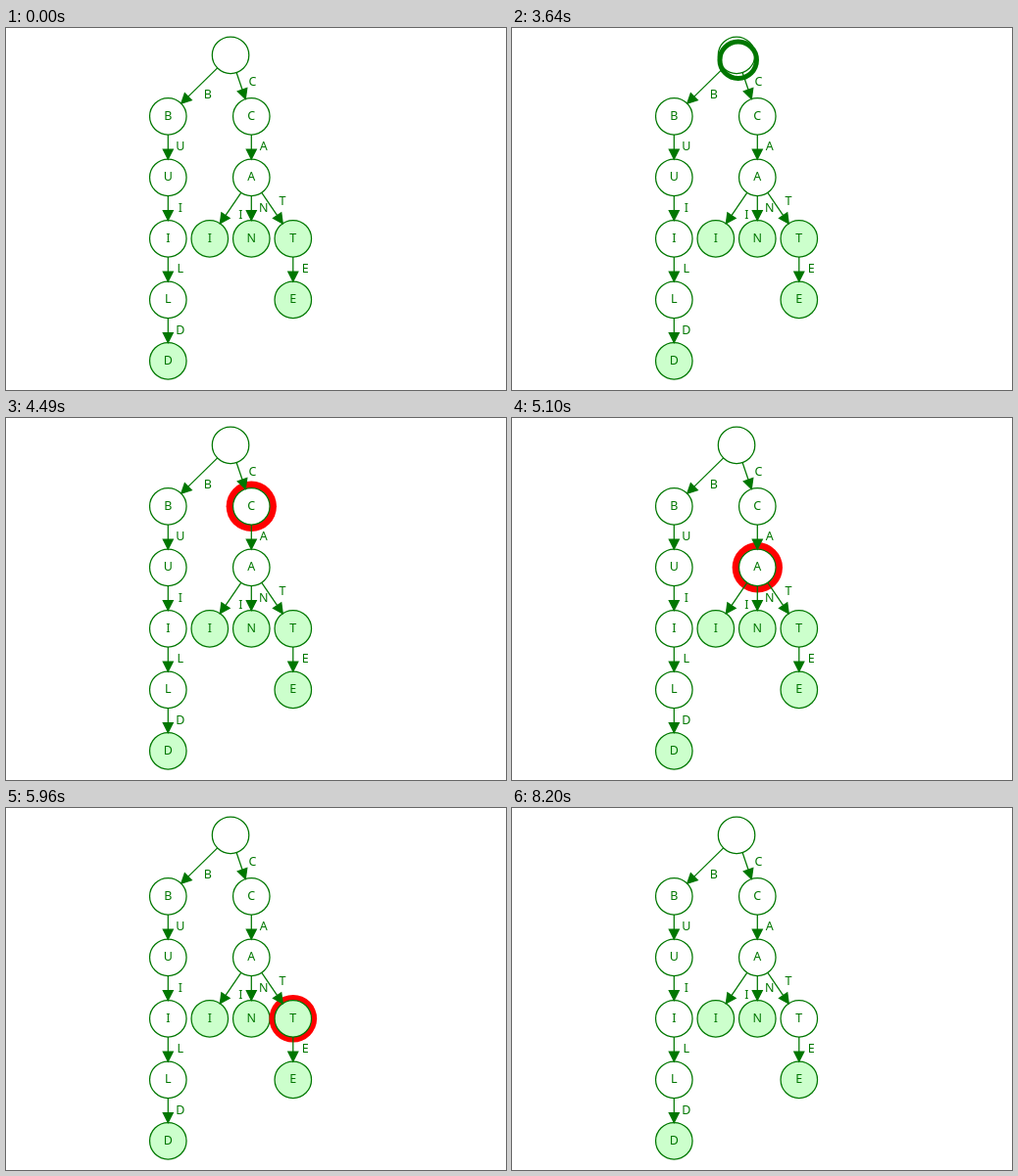
An HTML page with a canvas for the animation above (8500 ms loop, 510 by 370 pixels).

```html
<!DOCTYPE html>
<html lang="en">
<head>
<meta charset="utf-8">
<title>Trie deletion</title>
<style>
  html, body { margin: 0; width: 100%; height: 100%; overflow: hidden; background: #fff; }
  canvas { display: block; }
</style>
</head>
<body>
<canvas id="stage" width="510" height="370"></canvas>
<script>
const ctx = document.getElementById('stage').getContext('2d');
const GREEN = '#007700', WORD = '#ccffcc', RED = '#ff0000';
const LOOP = 8500, R = 18.75;
const START = 3173, TICK = 76.9;      // screen refresh of the moving part
const FIRST = 3153, STEP = 453;       // highlight and move steps alternate

const node = (text, col, row, parent, word) =>
  ({ text, x: 165.3 + 42.5 * col, y: 27.8 + 62.5 * row, parent, word });

const root = node('', 1.5, 0);
const b = node('B', 0, 1, root), u = node('U', 0, 2, b), i = node('I', 0, 3, u);
const l = node('L', 0, 4, i), d = node('D', 0, 5, l, true);
const c = node('C', 2, 1, root), a = node('A', 2, 2, c);
const ai = node('I', 1, 3, a, true), n = node('N', 2, 3, a, true);
const t = node('T', 3, 3, a, true), e = node('E', 3, 4, t, true);
const nodes = [root, b, u, i, l, d, c, a, ai, n, t, e];
const path = [root, c, a, t];

function circle(x, y, r) {
  ctx.beginPath();
  ctx.arc(x, y, r, 0, Math.PI * 2);
}

function label(text, x, y) {
  ctx.fillStyle = GREEN;
  ctx.fillText(text, x, y);
}

function drawNode(p, fill) {
  circle(p.x, p.y, R);
  ctx.fillStyle = fill;
  ctx.fill();
  ctx.stroke();
  label(p.text, p.x, p.y);
}

function drawEdge(p, q) {
  const len = Math.hypot(q.x - p.x, q.y - p.y);
  const dx = (q.x - p.x) / len, dy = (q.y - p.y) / len;
  const tx = q.x - dx * R, ty = q.y - dy * R;
  ctx.beginPath();
  ctx.moveTo(p.x + dx * R, p.y + dy * R);
  ctx.lineTo(tx, ty);
  ctx.stroke();

  const bx = tx - dx * 10, by = ty - dy * 10;
  ctx.beginPath();
  ctx.moveTo(tx, ty);
  ctx.lineTo(bx + dy * 5, by - dx * 5);
  ctx.lineTo(bx - dy * 5, by + dx * 5);
  ctx.closePath();
  ctx.fillStyle = GREEN;
  ctx.fill();
  ctx.stroke();
  label(q.text, (p.x + q.x) / 2 + dy * 12.5, (p.y + q.y) / 2 - dx * 12.5);
}

// Triangle wave between 3.75 and 8.75 px
function pulse(time) {
  const phase = (((time - 4795) / 1690) % 1 + 1) % 1;
  return 3.75 + 5 * Math.abs(1 - 2 * phase);
}

function draw(time) {
  const now = START + 7 + Math.floor((time - START) / TICK) * TICK;
  const pos = (now - FIRST) / STEP;
  const active = time >= 3190 && pos < 8;
  const step = Math.min(Math.floor(pos), 6);
  const current = active && step % 2 === 0 ? path[step / 2] : null;
  const fill = p => p.word && !(p === t && pos >= 8) ? WORD : '#fff';

  ctx.fillStyle = '#fff';
  ctx.fillRect(0, 0, 510, 370);
  ctx.strokeStyle = GREEN;
  ctx.lineWidth = 1.25;
  ctx.font = '12.5px "Noto Sans", sans-serif';
  ctx.textAlign = 'center';
  ctx.textBaseline = 'middle';

  for (const p of nodes) if (p !== current) drawNode(p, fill(p));
  if (current) {
    circle(current.x, current.y, R + pulse(now));
    ctx.fillStyle = RED;
    ctx.fill();
    drawNode(current, fill(current));
  }
  for (const p of nodes) if (p.parent) drawEdge(p.parent, p);

  if (active && !current) {
    const from = path[(step - 1) / 2], to = path[(step + 1) / 2], k = pos - step;
    circle(from.x + (to.x - from.x) * k, from.y + (to.y - from.y) * k, R);
    ctx.lineWidth = 5;
    ctx.stroke();
  }
}

const origin = performance.now();
function frame() {
  draw((performance.now() - origin) % LOOP);
  requestAnimationFrame(frame);
}
frame();
</script>
</body>
</html>
```
